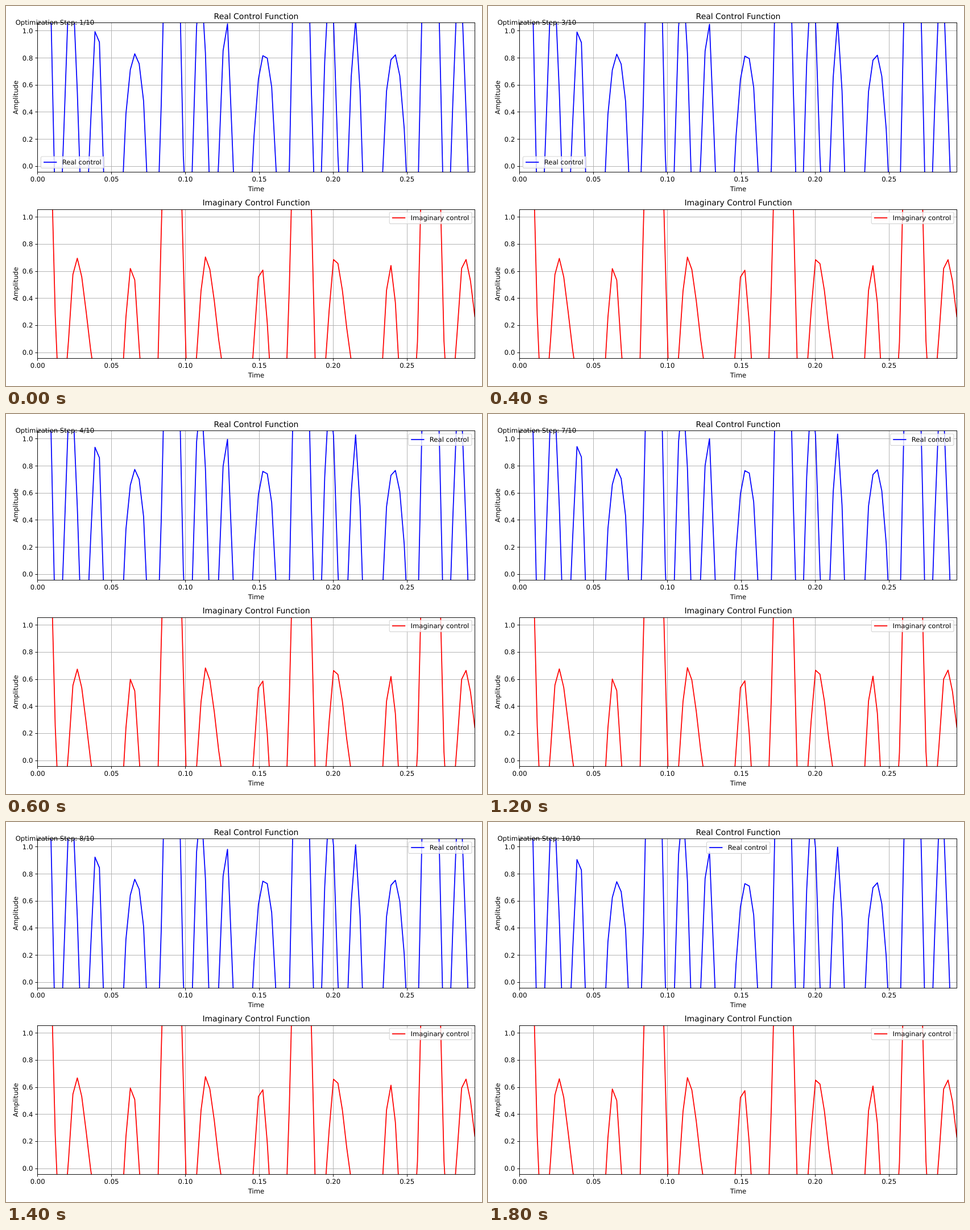
Recreate the animation shown at these times as an HTML page. Size 837 by 669 pixels, loop 2000 ms.

```html
<!DOCTYPE html>
<html lang="en">
<head>
<meta charset="utf-8">
<title>Control functions</title>
<style>
html, body { margin: 0; width: 100%; height: 100%; overflow: hidden; background: #fff; }
svg { display: block; width: 837px; height: 669px; }
text { font: 11.65px "DejaVu Sans", sans-serif; text-rendering: geometricPrecision; }
text.title { font-size: 13.97px; }
.mid { text-anchor: middle; }
.end { text-anchor: end; }
.grid { stroke: #b0b0b0; stroke-width: .93; }
.tick { stroke: #000; stroke-width: .93; }
.frame { fill: none; stroke: #000; stroke-width: .93; }
.curve { fill: none; stroke-width: 1.74; stroke-linejoin: round; }
.box { fill: #fff; fill-opacity: .8; stroke: #ccc; stroke-opacity: .8; stroke-width: 1.16; }
</style>
</head>
<body>
<svg id="stage" viewBox="0 0 837 669"></svg>
<script>
const LEFT = 55.5, RIGHT = 824.5, MID = 440;
const UNIT = 238.5, TICK_DX = 129.88;
const SAMPLES = 100, DX = (RIGHT - LEFT) / (SAMPLES - 1);
const ORIGIN = 63.9, PERIOD = 227.5;
const STEP_MS = 200, STEPS = 10;

// Vertical shift of the real curve per optimization step; the imaginary one moves by a fixed share.
const SHIFT = [0, -.002, -.003, -.056, -.057, -.05, -.051, -.07, -.069, -.088];
const IMAG_SHARE = .385;

// Pulses of one period: centre, height, width to zero on each side, power of the cosine.
const pulse = (centre, height, left, right, power = 1) => ({ centre, height, left, right, power });
const REAL = [
  pulse(0, 2.75, 20.6, 20.8),
  pulse(50.5, 1.4, 14.3, 14.8),
  pulse(96.3, 1.085, 14, 11.2),
  pulse(-64.1, .83, 20.2, 20.1, .62)
];
const IMAG = [
  pulse(0, 2.75, 23.3, 24.2),
  pulse(59, .703, 14.6, 26.8, 1.2),
  pulse(-70.3, .643, 13.4, 13.4, .9)
];

function pulseAt(p, x) {
  let d = x - ORIGIN - p.centre;
  d -= PERIOD * Math.round(d / PERIOD);
  const angle = Math.min(Math.PI, Math.abs(d) / (d < 0 ? p.left : p.right) * Math.PI / 2);
  const c = Math.cos(angle);
  return p.height * Math.sign(c) * Math.abs(c) ** p.power;
}

// The highest pulse wins; valleys are softened.
function control(pulses, x) {
  const v = Math.max(...pulses.map(p => pulseAt(p, x)));
  return v < 0 ? v / (1 - .5 * v) : v;
}

const stage = document.getElementById('stage');

function add(parent, tag, attrs, content) {
  const el = document.createElementNS('http://www.w3.org/2000/svg', tag);
  for (const k in attrs) el.setAttribute(k, attrs[k]);
  if (content) el.textContent = content;
  parent.appendChild(el);
  return el;
}
const line = (p, cls, x1, y1, x2, y2) => add(p, 'line', { class: cls, x1, y1, x2, y2 });
const label = (p, cls, x, y, s) => add(p, 'text', { class: cls, x, y }, s);
const snap = v => Math.round(v) + .5;

function legend(color, name, width) {
  const g = add(stage, 'g', {});
  add(g, 'rect', { class: 'box', x: 0, y: 0, width, height: 20.4, rx: 2.3 });
  add(g, 'line', { class: 'curve', stroke: color, x1: 4.7, y1: 10, x2: 28, y2: 10 });
  label(g, '', 37.3, 14.3, name);
  return (x, y) => g.setAttribute('transform', `translate(${x} ${y})`);
}

function plot({ id, title, titleY, color, pulses, top, bottom, zero, name, width }) {
  const height = bottom - top;
  const clip = add(stage, 'clipPath', { id });
  add(clip, 'rect', { x: LEFT, y: top, width: RIGHT - LEFT, height });

  for (let i = 0; i < 6; i++) {
    const tx = LEFT + i * TICK_DX, ty = zero - i * .2 * UNIT;
    const x = snap(tx - .1), y = snap(ty);
    line(stage, 'grid', x, top, x, bottom);
    line(stage, 'grid', LEFT, y, RIGHT, y);
    line(stage, 'tick', x, bottom, x, bottom + 4.1);
    line(stage, 'tick', LEFT - 4.1, y, LEFT, y);
    label(stage, 'mid', tx + .2, bottom + 16.8, (i * .05).toFixed(2));
    label(stage, 'end', 47.3, ty + 4.5, (i * .2).toFixed(1));
  }
  const holder = add(stage, 'g', { 'clip-path': `url(#${id})` });
  const points = Array.from({ length: SAMPLES }, (_, i) => {
    const x = LEFT + i * DX;
    return `${x.toFixed(2)},${(zero - control(pulses, x) * UNIT).toFixed(2)}`;
  });
  const curve = add(holder, 'polyline', { class: 'curve', stroke: color, points: points.join(' ') });
  add(stage, 'rect', { class: 'frame', x: LEFT, y: top, width: RIGHT - LEFT, height });

  label(stage, 'title mid', MID, titleY, title);
  label(stage, 'mid', MID, bottom + 33.2, 'Time');
  add(stage, 'text', { class: 'mid', transform: `translate(21 ${(top + bottom) / 2}) rotate(-90)` }, 'Amplitude');

  return {
    shift: v => curve.setAttribute('transform', `translate(0 ${-v * UNIT})`),
    place: legend(color, name, width)
  };
}

const real = plot({
  id: 'clipReal', title: 'Real Control Function', titleY: 22.8, color: '#00f', pulses: REAL,
  top: 29.5, bottom: 292.5, zero: 281.8, name: 'Real control', width: 111.4
});
const imag = plot({
  id: 'clipImag', title: 'Imaginary Control Function', titleY: 350.8, color: '#f00', pulses: IMAG,
  top: 358.5, bottom: 620.5, zero: 609.6, name: 'Imaginary control', width: 144.8
});
imag.place(674.2, 363);
const counter = label(stage, '', 16.7, 33.4, '');

function legendSpot(step) {
  if (step < 3) return [61.4, 265];
  return step < 9 ? [707.5, 35] : [384.4, 35];
}

let shown = -1;
function draw(now) {
  const step = Math.floor(now / STEP_MS) % STEPS;
  if (step === shown) return;
  shown = step;
  real.shift(SHIFT[step]);
  imag.shift(SHIFT[step] * IMAG_SHARE);
  real.place(...legendSpot(step));
  counter.textContent = `Optimization Step: ${step + 1}/${STEPS}`;
}
function tick() {
  draw(performance.now());
  requestAnimationFrame(tick);
}
draw(0);
requestAnimationFrame(tick);
</script>
</body>
</html>
```
